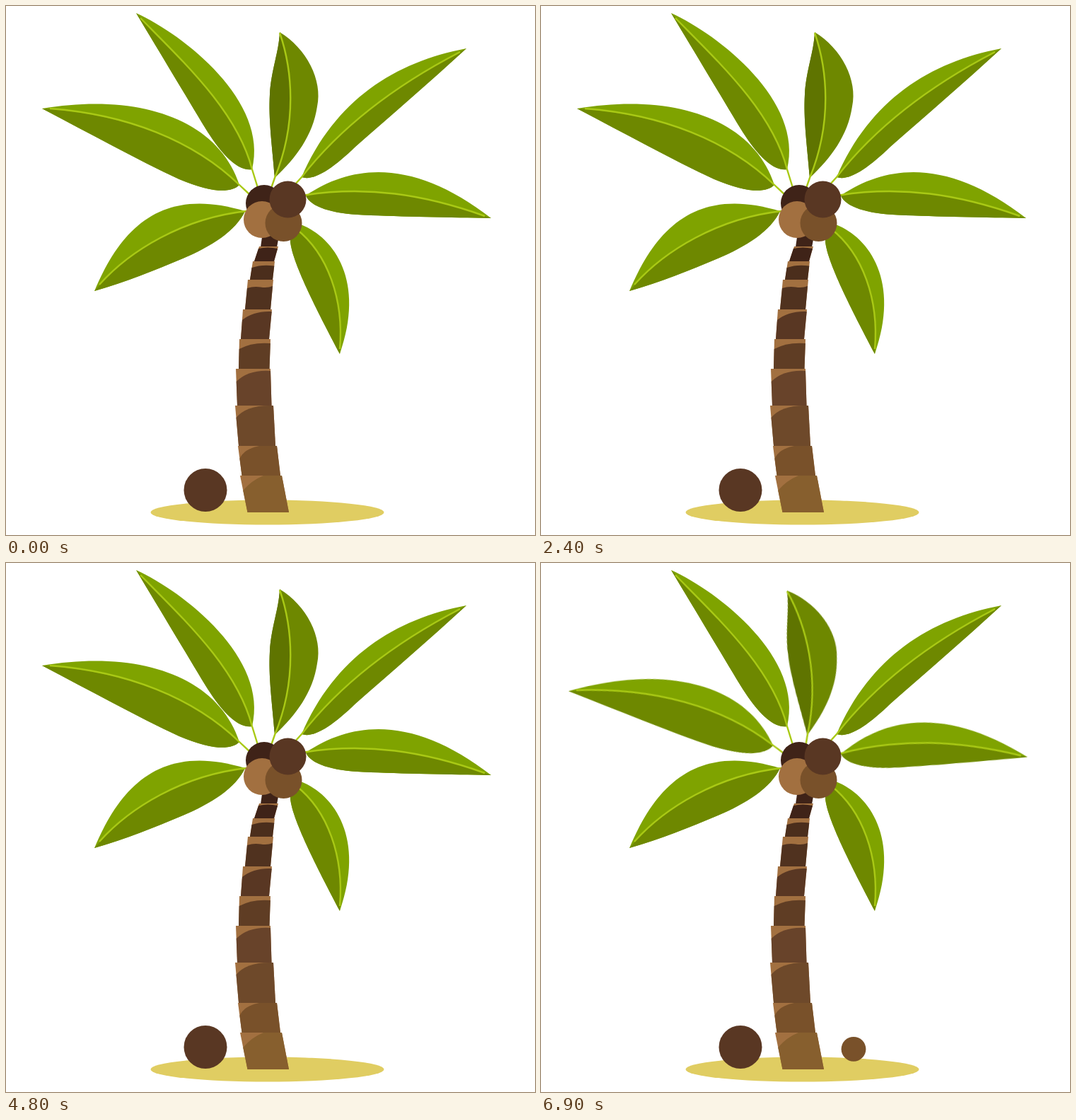
An HTML page without scripts for the animation above (7200 ms loop, 748 by 748 pixels).

```html
<!DOCTYPE html>
<html lang="en">
<head>
<meta charset="utf-8">
<title>Palm tree</title>
<style>
  html, body { margin: 0; width: 100%; height: 100%; overflow: hidden; background: #fff; }
  svg { display: block; width: 100vw; height: 100vh; }

  .light { fill: #7fa300; }
  .dark { fill: #6e8800; }
  .deep { fill: #5f7400; }
  .rib { fill: none; stroke: #a9c915; stroke-width: 2.4; }
  .bark { fill: #a27040; }

  /* Two hard poses, 300 ms each */
  .sway { animation: sway .6s step-end infinite; }
  .blink { animation: blink .6s step-end infinite; }
  .west { --turn: -6.3deg; transform-origin: 373px 272px; }
  .north { --turn: -10deg; transform-origin: 379px 261.7px; }
  .east { --turn: -6deg; transform-origin: 443px 268px; }
  @keyframes sway {
    0% { transform: rotate(0deg); }
    50%, 100% { transform: rotate(var(--turn)); }
  }
  @keyframes blink {
    0% { visibility: hidden; }
    50%, 100% { visibility: visible; }
  }
</style>
</head>
<body>
<svg viewBox="0 0 748 748">
  <!-- ground -->
  <ellipse cx="369.5" cy="716" rx="165" ry="17.5" fill="#e0cd62"/>
  <circle cx="282" cy="684.5" r="30.5" fill="#593723"/>
  <circle class="blink" cx="442" cy="687.3" r="17.4" fill="#79512a"/>

  <!-- leaves -->
  <g class="sway west">
    <path class="light" d="M51 145C188 122 300 160 330 253C318 265 290 264 245 245C185 217 120 181 51 145Z"/>
    <path class="dark" d="M51 145C170 153 265 190 330 253C318 265 290 264 245 245C185 217 120 181 51 145Z"/>
    <path class="rib" d="M62 145C170 153 265 190 330 253L345 267"/>
  </g>
  <g>
    <path class="light" d="M184 10C252 41 372 135 348 231C325 234 302 205 282 173C255 128 220 70 184 10Z"/>
    <path class="dark" d="M184 10C255 83 327 150 348 231C325 234 302 205 282 173C255 128 220 70 184 10Z"/>
    <path class="rib" d="M190 17C255 83 327 150 348 231L356 257"/>
  </g>
  <g class="sway north">
    <path class="dark" d="M387 37C425 60 448 105 440 142C434 183 410 215 380 243C376 195 371 160 373 125C375 90 386 65 387 37Z"/>
    <path class="deep" d="M387 37C405 90 412 165 380 243C376 195 371 160 373 125C375 90 386 65 387 37Z"/>
    <path class="rib" d="M387 38C405 90 412 165 380 243L375.5 256"/>
  </g>
  <g>
    <path class="light" d="M651 60C550 79 465 133 418 242C435 248 462 230 494 199C545 154 600 107 651 60Z"/>
    <path class="dark" d="M651 60C555 110 475 169 418 242C435 248 462 230 494 199C545 154 600 107 651 60Z"/>
    <path class="rib" d="M642 65C555 110 475 169 418 242L408 253"/>
  </g>
  <g class="sway east">
    <path class="light" d="M424 268C498 218 585 222 686 300C630 299 560 298 505 295.5C462 294 430 284 424 268Z"/>
    <path class="dark" d="M424 267C510 254 590 266 686 300C630 299 560 298 505 295.5C462 294 430 284 424 268Z"/>
    <path class="rib" d="M422 267.5C510 254 590 266 677 297"/>
  </g>
  <g>
    <path class="light" d="M125 403C162 314 220 254 338 290C325 318 290 340 250 357C210 374 170 390 125 403Z"/>
    <path class="dark" d="M125 403C175 345 250 300 338 290C325 318 290 340 250 357C210 374 170 390 125 403Z"/>
    <path class="rib" d="M132 394C175 346 250 300 340 290"/>
  </g>
  <g>
    <path class="light" d="M404 312L417 309C465 328 508 390 472 492C445 440 405 365 402 333Z"/>
    <path class="dark" d="M404 312L410 315C455 350 478 415 472 492C445 440 405 365 402 333Z"/>
    <path class="rib" d="M410 315C455 350 478 415 472 485"/>
  </g>

  <!-- trunk, top to bottom: ring, then its shaded body -->
  <path fill="#3f2318" d="M363 320H387L383 341H360Z"/>
  <path class="bark" d="M358 340H385L379 361H351Z"/>
  <path fill="#3f2318" d="M357 343Q370 340 384 343L379 361H351Z"/>
  <path class="bark" d="M349 361H380L377 387H345Z"/>
  <path fill="#4b2e1c" d="M347.5 370Q362 365 379.3 367.5L377 387H345Z"/>
  <path class="bark" d="M342 387H378L374 429H338Z"/>
  <path fill="#50321f" d="M341 399Q350 396 360 397.5T377 396L374 429H338Z"/>
  <path class="bark" d="M335 429H376L372 471H332Z"/>
  <path fill="#593723" d="M334 444Q350 431 375.7 432L372 471H332Z"/>
  <path class="bark" d="M330 471H374L372.5 513H329Z"/>
  <path fill="#5f3d24" d="M329.7 485Q348 475 373.8 477L372.5 513H329Z"/>
  <path class="bark" d="M325 513H374L375.5 565H327Z"/>
  <path fill="#68432a" d="M325.7 531Q343 514 374 516L375.5 565H327Z"/>
  <path class="bark" d="M324 565H378L381 622H329Z"/>
  <path fill="#6e492a" d="M325.5 582Q340 565 372 565H378L381 622H329Z"/>
  <path class="bark" d="M328 622H383L388 664H333.5Z"/>
  <path fill="#79512a" d="M330.4 640Q337 626 358 622H383L388 664H333.5Z"/>
  <path class="bark" d="M331 664H390L400 716H341.5Z"/>
  <path fill="#875f2e" d="M335.2 685Q347 671 364 664H390L400 716H341.5Z"/>

  <!-- coconuts -->
  <circle cx="365" cy="279" r="26" fill="#3f2318"/>
  <circle cx="362" cy="302" r="26" fill="#a27040"/>
  <circle cx="392.5" cy="307" r="26" fill="#79512a"/>
  <circle cx="398.5" cy="273.5" r="26" fill="#593723"/>
</svg>
</body>
</html>
```
